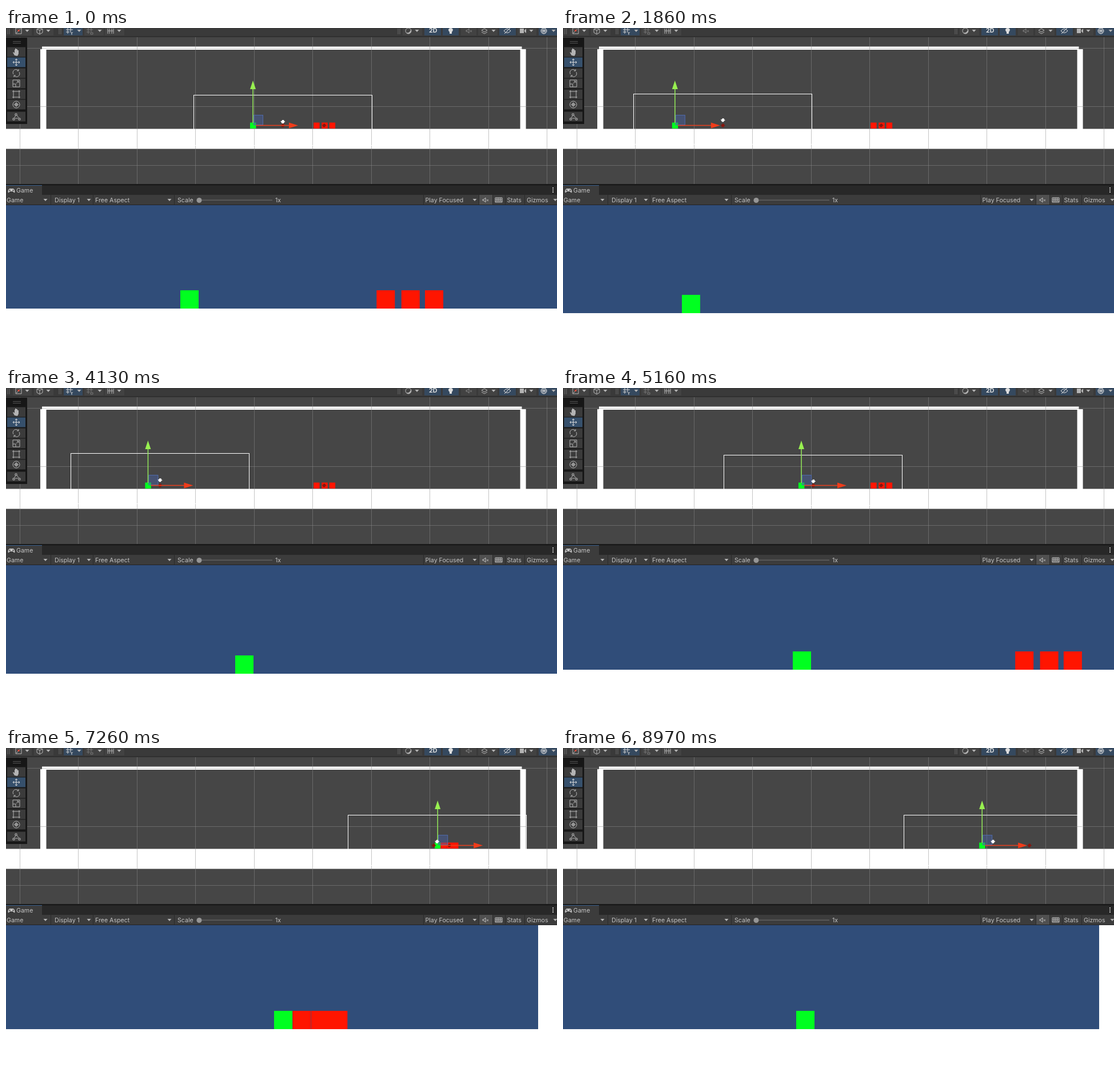
An HTML page with a canvas for the animation above (9 s loop, 964 by 581 pixels).

```html
<!DOCTYPE html>
<html lang="en">
<head>
<meta charset="utf-8">
<title>Editor and game view</title>
<style>
html, body { margin: 0; width: 100%; height: 100%; overflow: hidden; background: #464646; }
canvas { display: block; }
</style>
</head>
<body>
<canvas id="stage" width="964" height="581"></canvas>
<script>
const c = document.getElementById('stage').getContext('2d');
const LOOP = 9, ZOOM = 3.08, SIZE = 10.4, FLOOR = 176;
const WALL_LEFT = 70.5, WALL_RIGHT = 900;
const GREEN = '#00ff20', RED = '#ff1500', ICON = '#b4b4b4', ACTIVE = '#35495f';

// Player position over time: seconds, scene x
const walk = [[0, 432], [.33, 432], [.53, 415.5], [1.86, 196], [2.585, 76.4], [3.08, 76.4],
  [5.16, 416.8], [5.87, 532.7], [5.9, 532.7], [6.41, 613.7], [7.26, 755], [8.037, 884], [9, 728.5]];
const crates = [543.4, 557.5, 570.9], stack = [10.4, 21, 31.15];
const clamp = (v, lo, hi) => Math.max(lo, Math.min(hi, v));

function playerX(t) {
  const i = walk.findIndex(p => p[0] > t);
  const [t0, x0] = walk[i - 1], [t1, x1] = walk[i];
  return x0 + (x1 - x0) * (t - t0) / (t1 - t0);
}

// The camera trails a point ahead of the player
function followX(t) {
  const step = .005;
  let x = 484.2;
  for (let s = 0; s < t; s += step) x += (playerX(s) + 52.2 - x) * (1 - Math.exp(-step / .193));
  return x;
}

// Pushed crates vanish at the right wall
function crateXs(t) {
  const reach = t < 8.037 ? playerX(t) : 884;
  return crates.map((x, i) => Math.max(x, reach + stack[i])).filter(x => x + SIZE / 2 < 899);
}

function box(x, y, w, h, color) {
  c.fillStyle = color;
  c.fillRect(x, y, w, h);
}

function frame(x, y, w, h, color) {
  c.strokeStyle = color;
  c.lineWidth = 1;
  c.strokeRect(x, y, w, h);
}

function icon(x, y, path, color = ICON, filled = false) {
  c.save();
  c.translate(x, y);
  c.lineWidth = 1;
  c.strokeStyle = c.fillStyle = color;
  const shape = new Path2D(path);
  if (filled) c.fill(shape, 'evenodd');
  else c.stroke(shape);
  c.restore();
}

const caret = (x, y) => icon(x, y, 'M-3.5-2h7L0 2z', ICON, true);

function label(text, x, y, weight = 400, color = '#c4c4c4') {
  c.font = weight + ' 10.6px Inter, sans-serif';
  c.textBaseline = 'middle';
  c.fillStyle = color;
  c.fillText(text, x, y);
}

const CAMERA = 'M-4-1h2l1-2h3l.5 2 2 1-2 1-1 2h-3l-1-2z';
const MUTE = 'M-4-1h2l3-3v8l-3-3h-2zM3-1l3 3M6-1L3 2';

function drawScene(player, follow, camera, top, reds) {
  box(0, 16, 964, 258, '#464646');
  box(0, FLOOR + .5, 964, 35, '#fff');
  box(60, 37, 10.5, 140, '#fff');
  box(899.6, 37, 10, 140, '#fff');
  box(63, 32.5, 839.5, 5.5, '#fff');
  for (let i = 0; i < 10; i++) box(Math.floor(24 + i * 102.5), 16, 1, 257, 'rgba(140,140,140,.5)');
  for (let i = 0; i < 3; i++) box(0, Math.floor(35 + i * 102.5), 964, 1, 'rgba(140,140,140,.5)');

  box(player - 5, 165.5, SIZE, SIZE, GREEN);
  for (const x of reds) box(x - SIZE / 2, 165.5, SIZE, SIZE, RED);
  frame(Math.round(camera - 156.5) + .5, Math.round(top) + .5, 312, 88, '#fff');

  if (reds.length) icon(Math.max(556.5, player - 7), 170.5, CAMERA, '#86160e', true);
  icon(follow, 170.5, CAMERA, '#86160e', true);
  box(player + 1, 153, 17, 17, 'rgba(70,95,165,.45)');
  frame(player + 1.5, 152.5, 16, 17, '#5069a8');
  box(player - .7, 106, 1.5, 60, '#93e95a');
  icon(player, 92, 'M0 0L5 15H-5z', '#98f050', true);
  box(player + 5, 169.7, 60, 1.5, '#e8401f');
  icon(player + 79, 170.5, 'M0 0L-16-5V5z', '#f03c1a', true);
  icon(camera, top + 46.7, CAMERA, '#fff', true);
}

function drawGame(player, camera, ground, reds) {
  const sx = x => 482 + (x - camera) * ZOOM, side = 32;
  const floor = Math.round(ground);
  box(0, 310, 964, 271, '#304d79');
  for (const x of reds) box(sx(x) - side / 2, floor - side, side, side, RED);
  box(Math.round(sx(player)) - side / 2, floor - side, side, side, GREEN);
  box(0, floor, 964, 581 - floor, '#fff');
  box(0, 310, Math.max(0, Math.round(sx(WALL_LEFT))), 271, '#fff');
  box(Math.round(sx(WALL_RIGHT)), 310, 964, 271, '#fff');
}

function drawTopBar() {
  box(0, 0, 964, 15, '#3a3a3a');
  box(0, 14.5, 964, 1.5, '#2c2c2c');
  for (const [x, w, on] of [[12, 33], [49, 34], [101, 33, 1], [137, 34], [173, 34], [694, 34], [732, 29, 1],
    [764, 28, 1], [796, 27], [826, 34], [863, 29, 1], [895, 33], [932, 32, 1]])
    box(x, 0, w, 13, on ? ACTIVE : '#424242');
  for (const x of [3, 93, 686]) icon(x, 1, 'M0 0v10M3 0v10', '#6a6a6a');
  for (const x of [37, 74, 128, 164, 198, 719, 853, 919, 958]) caret(x, 5);
  icon(22, 5, 'M-5-5h10v10h-10zM-4 4L3-3');
  box(20.5, 3, 3, 3, '#d84a3a');
  icon(59, 5, 'M-5-3l5-2 5 2v6l-5 3-5-3zM-5-3l5 2 5-2M0-1v7');
  icon(111, 5, 'M-6-2H6M-6 2H0M-3-5V5M2-5V2M2 2l2 2 2-2M4 4v3', '#d5d5d5');
  icon(147, 5, 'M-6-2H5M-6 2H0M-3-5V5M2-5V2M1 3h4v3H1z', '#777');
  icon(183, 5, 'M-5-4V5M5-4V5M-2-4V5M2-4V5M-5 0H5');
  icon(704, 5, 'M5 0A5 5 0 1 1-5 0 5 5 0 0 1 5 0');
  icon(704, 5, 'M4-3A5 5 0 0 1-4 3 6 6 0 0 0 4-3', ICON, true);
  label('2D', 740, 5, 700, '#dedede');
  icon(778, 5, 'M-2 2C-6-2-3-5 0-5S6-2 2 2V5H-2z', '#dedede', true);
  icon(809, 5, MUTE, '#858585');
  icon(837, 5, 'M-5-1l5-3 5 3-5 3zM-5 2l5 3 5-3');
  icon(877, 5, 'M-6 0Q0-7 6 0 0 7-6 0M-5 5L5-5M-1 0h2', '#dedede');
  icon(904, 5, 'M-5-4h7v8h-7zM3-1l3-3v8l-3-3z', ICON, true);
  icon(941, 5, 'M5 0A5 5 0 1 1-5 0 5 5 0 0 1 5 0M-5 0H5M0-5V5M-3-4Q0 0-3 4M3-4Q0 0 3 4', '#dedede');
}

function drawTools() {
  box(0, 17, 37, 151, '#171717');
  icon(12, 23.5, 'M0 0h14M0 3h14', '#555');
  const tools = [
    [42, 'M-3 6l-3-5 1-1 2 2v-6h1v4-6h2v6-5h2v5-3h2v6l-2 4z'],
    [60, 'M-6 0H6M0-6V6M-4-2l-2 2 2 2M4-2l2 2-2 2M-2-4l2-2 2 2M-2 4l2 2 2-2'],
    [79, 'M-5 2A5 5 0 0 1 4-4M5-2A5 5 0 0 1-4 4M4-7v3H1M-4 7V4H-1'],
    [97, 'M-6-6H6V6H-6zM-6 1h5v5M0 0l4-4M1-4h3v3'],
    [116, 'M-3-5H3M-3 5H3M-5-3V3M5-3V3M-6-6h2v2h-2zM4-6h2v2H4zM-6 4h2v2h-2zM4 4h2v2H4z'],
    [134, 'M6 0A6 6 0 1 1-6 0 6 6 0 0 1 6 0M-4 0H4M0-4V4M-2-2h4v4h-4z'],
    [155, 'M-6 3h3v3h-3zM-2-5h3v3h-3zM4 3h3v3H4zM-4 3l3-5M1-2l4 5M-2 3h5']
  ];
  for (const [y, path] of tools) {
    box(2, y - 8.5, 32, 17, y === 60 ? '#36506c' : '#3b3b3b');
    icon(18, y, path, y === 60 ? '#dedede' : ICON, y === 42);
  }
}

function drawGameBar() {
  box(0, 273, 964, 19, '#191919');
  box(0, 275.5, 964, 16.5, '#282828');
  box(0, 275.5, 63, 17, '#3c3c3c');
  box(0, 275, 63, 1, '#3a5f8c');
  icon(9.5, 285, 'M-3-4H3Q6-3 6 2 5 5 3 1H-3Q-5 5-6 2-6-3-3-4M-4-2h2v2h-2zM2-2h2v2H2z', '#c4c4c4', true);
  label('Game', 18, 285);
  for (const y of [279, 282.5, 286]) box(956, y, 2, 2, '#c4c4c4');

  box(0, 292, 964, 18, '#3c3c3c');
  box(0, 309, 964, 1, '#232323');
  box(828, 292, 23, 17, '#505050');
  for (const x of [78, 152, 294, 730, 827, 851, 873, 907]) box(x, 292, 1, 17, '#2a2a2a');
  for (const [text, x] of [['Game', 1], ['Display 1', 85], ['Free Aspect', 156], ['Scale', 300], ['1x', 471],
    ['Play Focused', 733.5], ['Stats', 876.5], ['Gizmos', 911]]) label(text, x, 301.5);
  for (const x of [69, 145, 286, 820, 961]) caret(x, 301);
  box(338, 300.5, 128, 1.5, '#606060');
  icon(338, 301.5, 'M4.5 0A4.5 4.5 0 1 1-4.5 0 4.5 4.5 0 0 1 4.5 0', '#969696', true);
  icon(838, 301, MUTE, '#c4c4c4');
  icon(862, 301, 'M-6-4H6V4H-6zM-6-1H6M-6 2H6M-3-4V2M0-4V2M3-4V2', '#c4c4c4');
}

function draw(now) {
  const t = now / 1000 % LOOP;
  const player = playerX(t), follow = followX(t), reds = crateXs(t);
  // A short overshoot when the camera meets its right limit
  const late = Math.max(0, t - 7.12);
  const camera = clamp(follow, 216.7, 752.1) + 165 * late * Math.exp(-late / .057);
  const ground = 490.8 + Math.max(0, 490 - camera) * .0395 + Math.max(0, camera - 634) * .009;
  const top = FLOOR - (ground - 310) / ZOOM;
  drawScene(player, follow, camera, top, reds);
  drawTopBar();
  drawTools();
  drawGame(player, camera, ground, reds);
  drawGameBar();
  requestAnimationFrame(draw);
}
requestAnimationFrame(draw);
</script>
</body>
</html>
```
